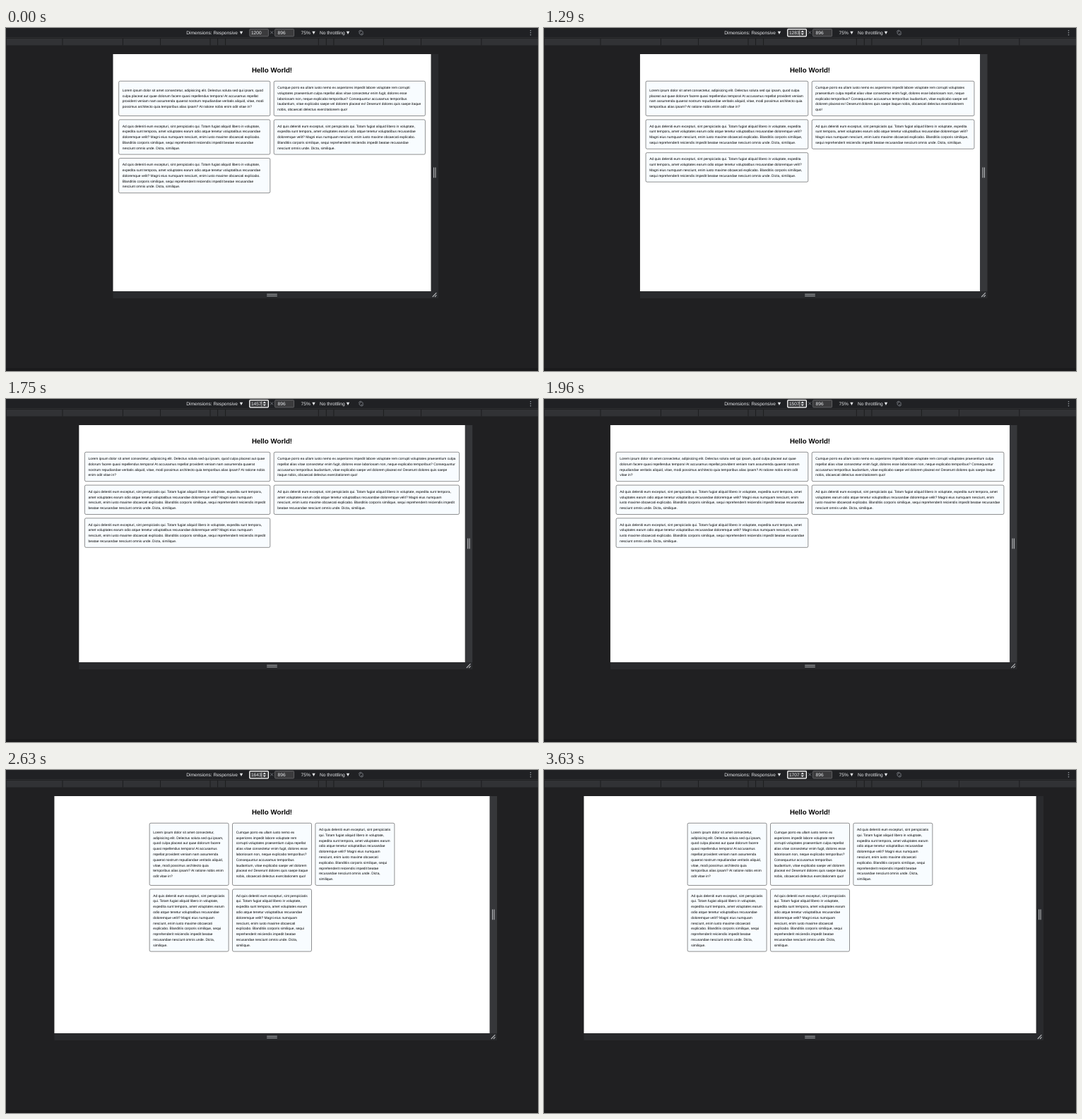
An HTML page that plays this animation: 753 px wide and 486 px high, repeating every 4.25 s.

```html
<!DOCTYPE html>
<html lang="en">
<head>
<meta charset="utf-8">
<title>Responsive cards</title>
<style>
  html, body { margin: 0; width: 100%; height: 100%; overflow: hidden; background: #202022; }
  svg { display: block; width: 753px; height: 486px; }
  text { font-family: "Liberation Sans", Arial, sans-serif; text-rendering: geometricPrecision; white-space: pre; }
  .bar text { font-size: 6.6px; fill: #e8eaed; }
  .field { fill: #3b3b3d; stroke: #77787a; stroke-width: .7; }
  .field.focus { stroke: #fff; stroke-width: 1.3; }
  .grip { stroke: #b4b6b9; stroke-width: 1.1; fill: none; }
  .card rect { fill: #f8fcff; stroke: #222; stroke-width: 1.33; }
  .card text { font-size: 13px; fill: #000; }
  h1, .title { font-size: 26px; font-weight: bold; text-anchor: middle; }
</style>
</head>
<body>
<svg viewBox="0 0 753 486">
  <rect width="753" height="486" fill="#202022"/>
  <rect width="753" height="13" fill="#202124"/>
  <rect y="13" width="753" height=".6" fill="#36373a"/>
  <rect y="482" width="753" height="4" fill="#1a1a1c"/>
  <g id="ruler"><rect y="15" width="753" height="9.5" fill="#313235"/></g>

  <g class="bar">
    <text x="255.3" y="9.1">Dimensions: Responsive</text>
    <text x="417.6" y="9.1">75%</text>
    <text x="444" y="9.1">No throttling</text>
    <path id="arrows" fill="#e8eaed"/>
    <rect id="field" class="field" x="344.8" y="1.6" width="26.6" height="10.2" rx="1"/>
    <text id="value" x="346.9" y="9.1"></text>
    <path id="caret" d="M361.8 3.2V10.6" stroke="#fff" stroke-width=".6"/>
    <path id="spin" d="M363.6 6L365.8 3.4L368 6ZM363.6 7.5L365.8 10.1L368 7.5Z" fill="#e8eaed"/>
    <path d="M374.2 4.4l4 4m0 -4l-4 4" stroke="#9aa0a6" stroke-width=".6"/>
    <rect class="field" x="380.6" y="1.6" width="27" height="10.2" rx="1"/>
    <text x="384.6" y="9.1">896</text>
    <g fill="none" stroke="#9aa0a6" stroke-width=".7">
      <rect x="500.9" y="4.1" width="3.4" height="5" rx=".5" transform="rotate(45 502.6 6.6)"/>
      <path d="M499.3 5.6A3.4 3.4 0 0 1 502.6 3.1M505.9 7.6A3.4 3.4 0 0 1 502.6 10.1"/>
    </g>
    <g fill="#9aa0a6">
      <circle cx="742.5" cy="3.7" r=".8"/><circle cx="742.5" cy="6.7" r=".8"/><circle cx="742.5" cy="9.7" r=".8"/>
    </g>
  </g>

  <rect id="bottom" y="373" height="10" fill="#292a2d"/>
  <rect id="side" y="37" width="10.5" height="336"/>
  <rect id="screen" y="37" height="336" fill="#fff"/>
  <path class="grip" d="M369.2 377.2h14.6M369.2 379.8h14.6"/>
  <path id="edge" class="grip" d="M4 197.6v14.6M6.4 197.6v14.6M2.2 381L7.8 375.2M5.4 381L7.9 378.4"/>

  <g id="page">
    <text class="title" y="68.5">Hello World!</text>
    <g id="cards"></g>
  </g>
</svg>
<script>
const LOOP = 4250, FPS = 24, SCALE = 0.375, MID = 376.5, TOP = 37;
const FONT = 13, LINE = 20.8, GAP = 13, INSET = 14.33, MARGIN = 21, CARDS_TOP = 101.3;

// [tick, viewport width] at 24 ticks per second
const WIDTHS = [[24, 1208], [27, 1208], [37, 1395], [40, 1437], [47, 1507], [53, 1571],
  [54, 1571], [56, 1592], [63, 1643], [64, 1643], [67, 1677], [74, 1707]];

const AD = "Ad quis deleniti eum excepturi, sint perspiciatis qui. Totam fugiat aliquid libero in voluptate, expedita sunt tempora, amet voluptates earum odio atque tenetur voluptatibus recusandae doloremque velit? Magni eius numquam nesciunt, enim iusto maxime obcaecati explicabo. Blanditiis corporis similique, sequi reprehenderit reiciendis impedit beatae recusandae nesciunt omnis unde. Dicta, similique.";
const TEXTS = [
  "Lorem ipsum dolor sit amet consectetur, adipisicing elit. Delectus soluta sed qui ipsam, quod culpa placeat aut quae dolorum facere quasi repellendus tempora! At accusamus repellat provident veniam nam assumenda quaerat nostrum repudiandae veritatis aliquid, vitae, modi possimus architecto quia temporibus alias ipsam? At ratione nobis enim odit vitae in?",
  "Cumque porro ea ullam iusto nemo ex asperiores impedit labore voluptate rem corrupti voluptates praesentium culpa repellat alias vitae consectetur enim fugit, dolores esse laboriosam non, neque explicabo temporibus? Consequuntur accusamus temporibus laudantium, vitae explicabo saepe vel dolorem placeat ex! Deserunt dolores quis saepe itaque nobis, obcaecati delectus exercitationem quo!",
  AD, AD, AD
];

const $ = id => document.getElementById(id);
const set = (el, attrs) => { for (const k in attrs) el.setAttribute(k, attrs[k]); return el; };
const add = (parent, tag, attrs) =>
  parent.appendChild(set(document.createElementNS("http://www.w3.org/2000/svg", tag), attrs));

const pen = document.createElement("canvas").getContext("2d");
pen.font = FONT * 10 + 'px "Liberation Sans", Arial, sans-serif';
const measure = s => pen.measureText(s).width / 10;

function wrap(text, max) {
  const lines = [];
  let line = "";
  for (const word of text.split(" ")) {
    const next = line ? line + " " + word : word;
    if (line && measure(next) > max) {
      lines.push(line);
      line = word;
    } else line = next;
  }
  return lines.concat(line);
}

for (const x of [80, 165.4, 218.5, 289, 299.6, 310.6])
  for (const at of [x, 752.9 - x])
    add($("ruler"), "rect", { x: at - 0.5, y: 15, width: 1, height: 9.5, fill: "#1d1d1f" });
add($("ruler"), "rect", { x: 0, y: 15, width: 0.7, height: 9.5, fill: "#1d1d1f" });
set($("arrows"), { d: [333, 435.5, 484].map(x => `M${x - 2.2} 4.7h4.4l-2.2 4.4z`).join("") });
set($("page"), { transform: `translate(${MID} ${TOP}) scale(${SCALE})` });

function viewportWidth(tick) {
  if (tick < WIDTHS[0][0]) return 1200;
  for (let i = 1; i < WIDTHS.length; i++) {
    const [a, from] = WIDTHS[i - 1], [b, to] = WIDTHS[i];
    if (tick < b) return Math.round(from + (to - from) * (tick - a) / (b - a));
  }
  return 1707;
}

function layout(width) {
  const cols = width >= 1600 ? 3 : 2;
  const cardW = cols === 3 ? 300 : (width - 2 * MARGIN - GAP) / 2;
  const left = -(cols * cardW + (cols - 1) * GAP) / 2;
  const blocks = TEXTS.map(t => wrap(t, cardW - 2 * INSET));
  const root = $("cards");
  root.replaceChildren();
  let y = CARDS_TOP;
  for (let i = 0; i < blocks.length; i += cols) {
    const row = blocks.slice(i, i + cols);
    const most = Math.max(...row.map(b => b.length));
    const h = most * LINE + 2 * INSET;
    row.forEach((lines, c) => {
      const x = left + c * (cardW + GAP);
      const card = add(root, "g", { class: "card" });
      add(card, "rect", { x: x + 0.67, y: y + 0.67, width: cardW - 1.33, height: h - 1.33, rx: 5 });
      const base = y + INSET + (most - lines.length) * LINE / 2 + 14.9;
      lines.forEach((line, n) => {
        add(card, "text", { x: x + INSET, y: base + n * LINE }).textContent = line;
      });
    });
    y += h + GAP;
  }
}

function resize(width) {
  const w = width * SCALE, left = MID - w / 2, right = MID + w / 2;
  set($("screen"), { x: left, width: w });
  set($("bottom"), { x: left, width: w + 10.5 });
  set($("side"), { x: right });
  set($("edge"), { transform: `translate(${right} 0)` });
  $("value").textContent = width;
  layout(width);
}

let shown = 0;
function draw(t) {
  const tick = Math.floor((t + 5) * FPS / 1000);
  const width = viewportWidth(tick);
  if (width !== shown) resize(shown = width);
  const focus = t >= 830;
  set($("field"), { class: focus ? "field focus" : "field" });
  set($("spin"), { visibility: focus ? "visible" : "hidden" });
  set($("caret"), { visibility: focus && t < 3630 ? "visible" : "hidden" });
  set($("side"), { fill: t >= 1000 && tick < 74 ? "#36373a" : "#292a2d" });
}

const start = performance.now();
function frame() {
  draw((performance.now() - start) % LOOP);
  requestAnimationFrame(frame);
}
frame();
</script>
</body>
</html>
```
